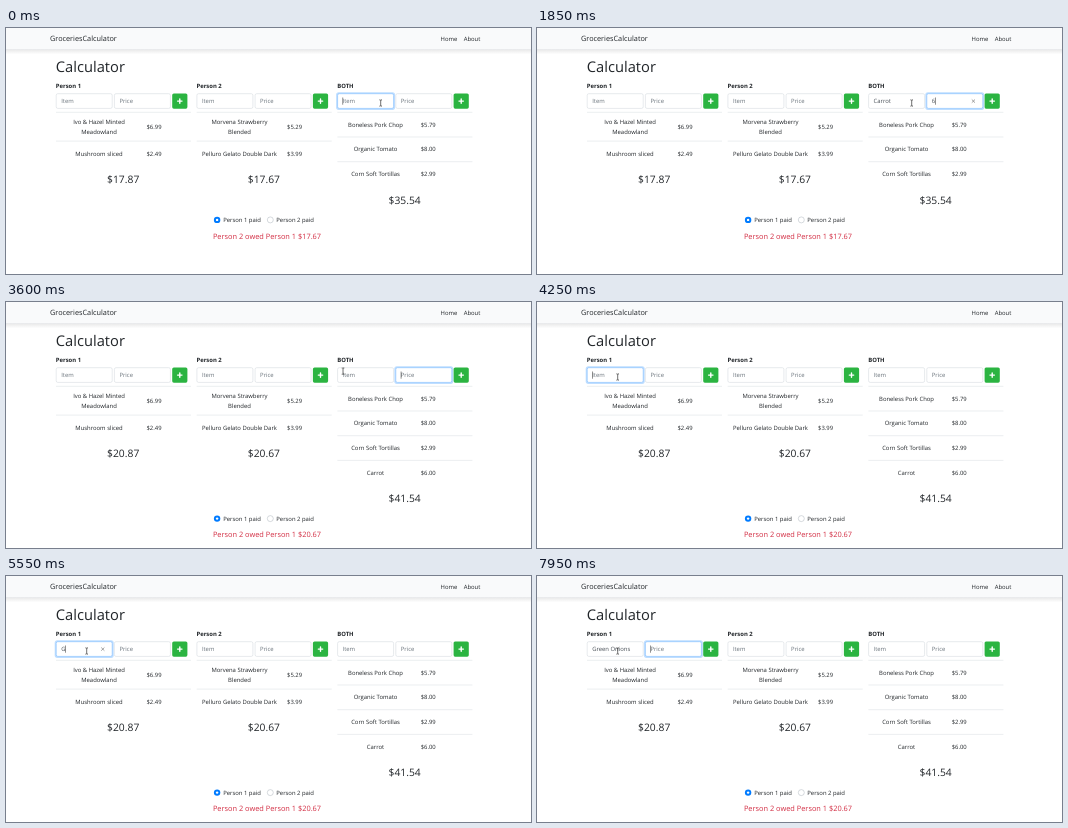
Recreate the animation shown at these times as an HTML page. Size 525 px wide and 246 px high, loop 8000 ms.

```html
<!DOCTYPE html>
<html lang="en">
<head>
<meta charset="utf-8">
<title>GroceriesCalculator</title>
<style>
  html, body { margin: 0; width: 100%; height: 100%; overflow: hidden; background: #fff; }
  svg { display: block; width: 100vw; height: 100vh; }
  text { font: 5.9px "Open Sans", "Noto Sans", sans-serif; fill: #212529; text-rendering: geometricPrecision; }
  .mid { text-anchor: middle; }
  .bold { font-weight: 700; }
  .brand { font-size: 7.3px; }
  .title { font-size: 14.7px; }
  .total { font-size: 10.3px; }
  .owed { font-size: 7.4px; fill: #d22c42; }
  .value { fill: #495057; }
  .value.empty { fill: #6c757d; }
  .box { fill: #fff; stroke: #ced4da; stroke-width: .5; }
  .focused .box { stroke: #80bdff; stroke-width: .6; }
  .ring { fill: #bfdeff; visibility: hidden; }
  .focused .ring { visibility: visible; }
  .caret { fill: #222; }
  .clear { stroke: #666; stroke-width: .6; }
  .rule { stroke: #dee2e6; stroke-width: .6; }
  .button { fill: #2bb441; }
  .plus { stroke: #fff; stroke-width: 1.4; stroke-linecap: round; }
  .ibeam { fill: none; stroke: #222; stroke-width: .65; }
  .arrow { fill: #fff; stroke: #111; stroke-width: .5; }
</style>
</head>
<body>
<svg id="stage" viewBox="0 0 525 246" preserveAspectRatio="none">
  <defs>
    <linearGradient id="shade" x2="0" y2="1">
      <stop stop-color="#000" stop-opacity=".09"/>
      <stop offset="1" stop-color="#000" stop-opacity="0"/>
    </linearGradient>
  </defs>
  <rect width="525" height="246" fill="#fff"/>
  <rect y="21.4" width="525" height="5" fill="url(#shade)"/>
  <rect width="525" height="21.4" fill="#f9fafb"/>
  <rect y="21" width="525" height=".5" fill="#dcdfe2"/>
  <text class="brand" x="44" y="13.1">GroceriesCalculator</text>
  <text x="434.6" y="12.8">Home</text>
  <text x="457.7" y="12.8">About</text>
  <text class="title" x="49.8" y="43.6">Calculator</text>
</svg>
<script>
const LOOP = 8000, BLINK = 530, ROW = 24.7, TOP = 84.3;
const stage = document.getElementById('stage');

function add(parent, tag, attrs, text) {
  const node = document.createElementNS('http://www.w3.org/2000/svg', tag);
  for (const key in attrs) node.setAttribute(key, attrs[key]);
  if (text) node.textContent = text;
  parent.append(node);
  return node;
}
const show = (node, on) => node.setAttribute('visibility', on ? 'visible' : 'hidden');

function addField(x, placeholder) {
  const group = add(stage, 'g', { transform: `translate(${x} 65.5)` });
  add(group, 'rect', { class: 'ring', x: -1.3, y: -1.3, width: 59, height: 17.7, rx: 2.6 });
  add(group, 'rect', { class: 'box', x: .2, y: .2, width: 56, height: 14.7, rx: 1.6 });
  const label = add(group, 'text', { class: 'value empty', x: 5.2, y: 9.8 }, placeholder);
  const caret = add(group, 'rect', { class: 'caret', y: 4, width: .5, height: 7.2 });
  const clear = add(group, 'path', { class: 'clear', d: 'M45.2 6l3.2 3.2m0-3.2l-3.2 3.2' });
  return { group, label, caret, clear, placeholder };
}

function updateField(field, value, focused, sinceEdit) {
  field.group.setAttribute('class', focused ? 'focused' : '');
  field.label.setAttribute('class', value ? 'value' : 'value empty');
  field.label.textContent = value || field.placeholder;
  const end = value ? field.label.getComputedTextLength() : 0;
  field.caret.setAttribute('x', 5.2 + end);
  show(field.caret, focused && Math.floor(sinceEdit / BLINK) % 2 === 0);
  show(field.clear, focused && value);
}

// Each row is [lines of the name, price].
function addColumn(x, heading, nameX, priceX, rows) {
  add(stage, 'text', { class: 'bold', x: x - .2, y: 60.3 }, heading);
  const item = addField(x, 'Item');
  const price = addField(x + 58.2, 'Price');
  add(stage, 'rect', { class: 'button', x: x + 116.2, y: 65.5, width: 15.2, height: 15.2, rx: 1.6 });
  add(stage, 'path', { class: 'plus', d: `M${x + 121.6} 73.1h4.4m-2.2-2.2v4.4` });
  let y = TOP;
  const groups = rows.map(([lines, cost]) => {
    const group = add(stage, 'g', {});
    const height = lines.length > 1 ? 28.8 : ROW;
    const base = y + height / 2 + 2.1;
    add(group, 'path', { class: 'rule', d: `M${x} ${y}h135` });
    lines.forEach((line, i) => add(group, 'text',
      { class: 'mid', x: nameX, y: base + (i - (lines.length - 1) / 2) * 9.6 }, line));
    add(group, 'text', { class: 'mid', x: priceX, y: base }, cost);
    y += height;
    return group;
  });
  const total = add(stage, 'text', { class: 'mid total', x: x + 67.2 });
  return { item, price, groups, total };
}

const one = addColumn(50, 'Person 1', 93, 148, [
  [['Ivo & Hazel Minted', 'Meadowland'], '$6.99'],
  [['Mushroom sliced'], '$2.49']]);
const two = addColumn(190.7, 'Person 2', 233.5, 288.6, [
  [['Morvena Strawberry', 'Blended'], '$5.29'],
  [['Pelluro Gelato Double Dark'], '$3.99']]);
const both = addColumn(331.4, 'BOTH', 369.5, 422.2, [
  [['Boneless Pork Chop'], '$5.79'],
  [['Organic Tomato'], '$8.00'],
  [['Corn Soft Tortillas'], '$2.99'],
  [['Carrot'], '$6.00']]);
const fields = [one, two, both].flatMap(c => [c.item, c.price]);
one.total.setAttribute('y', 154.7);
two.total.setAttribute('y', 154.7);

const footer = add(stage, 'g', {});
add(footer, 'circle', { cx: 211.1, cy: 191.9, r: 3.2, fill: '#007bff' });
add(footer, 'circle', { cx: 211.1, cy: 191.9, r: 1.2, fill: '#fff' });
add(footer, 'circle', { cx: 264.3, cy: 191.9, r: 3, fill: '#fff', stroke: '#adb5bd', 'stroke-width': .5 });
add(footer, 'text', { x: 217.2, y: 194.3 }, 'Person 1 paid');
add(footer, 'text', { x: 270.3, y: 194.3 }, 'Person 2 paid');
const owed = add(footer, 'text', { class: 'mid owed', x: 261, y: 210.8 });

const pointer = add(stage, 'g', {});
const ibeam = add(pointer, 'path', { class: 'ibeam', d: 'M-1.3-3.1h1l.3.3.3-.3h1M0-2.8v5.6M-1.3 3.1h1l.3-.3.3.3h1' });
const arrow = add(pointer, 'path', { class: 'arrow', d: 'M0 0v6.4l1.5-1.4 1 2.3 1-.4-1-2.3h2z' });

// Times at which the fields are entered, typed into and submitted.
const SUBMIT = 2150, CLICK = 4100;
const steps = [
  { at: -200, field: both.item, text: 'Carrot', from: 500, pace: 110 },
  { at: 1450, field: both.price, text: '6', from: 1780, pace: 110 },
  { at: SUBMIT, field: both.price, text: '' },
  { at: CLICK, field: one.item, text: 'Green Onions', from: 5450, pace: 125 },
  { at: 7500, field: one.price, text: '' }
];

function typing(step, t) {
  if (!step.text || t < step.from) return { value: '', edited: step.at };
  const count = Math.min(step.text.length, Math.floor((t - step.from) / step.pace) + 1);
  return { value: step.text.slice(0, count), edited: step.from + (count - 1) * step.pace };
}

function movePointer(t) {
  const p = Math.min(1, Math.max(0, (t - 3480) / 540));
  const eased = p * p * (3 - 2 * p);
  const x = 374.7 - 294 * eased;
  const y = 75 - 15 * Math.sin(Math.PI * eased);
  const column = (x - 50) % 140.7;
  const overField = y > 65.5 && (column < 56.4 || (column > 58.2 && column < 114.6));
  pointer.setAttribute('transform', `translate(${x} ${y})`);
  show(ibeam, overField);
  show(arrow, !overField);
}

function render(t) {
  const submitted = t >= SUBMIT;
  const active = steps.filter(step => step.at <= t);
  const current = active[active.length - 1];
  const values = new Map();
  for (const step of active) {
    if (submitted && step.at < SUBMIT) continue;
    values.set(step.field, typing(step, t).value);
  }
  for (const field of fields) {
    updateField(field, values.get(field) || '', field === current.field, t - typing(current, t).edited);
  }

  const shift = submitted ? ROW : 0;
  show(both.groups[3], submitted);
  one.total.textContent = submitted ? '$20.87' : '$17.87';
  two.total.textContent = submitted ? '$20.67' : '$17.67';
  both.total.textContent = submitted ? '$41.54' : '$35.54';
  both.total.setAttribute('y', 175.6 + shift);
  owed.textContent = 'Person 2 owed Person 1 ' + two.total.textContent;
  footer.setAttribute('transform', `translate(0 ${shift})`);
  movePointer(t);
}

const start = performance.now();
function tick() {
  render((performance.now() - start) % LOOP);
  requestAnimationFrame(tick);
}
tick();
</script>
</body>
</html>
```
